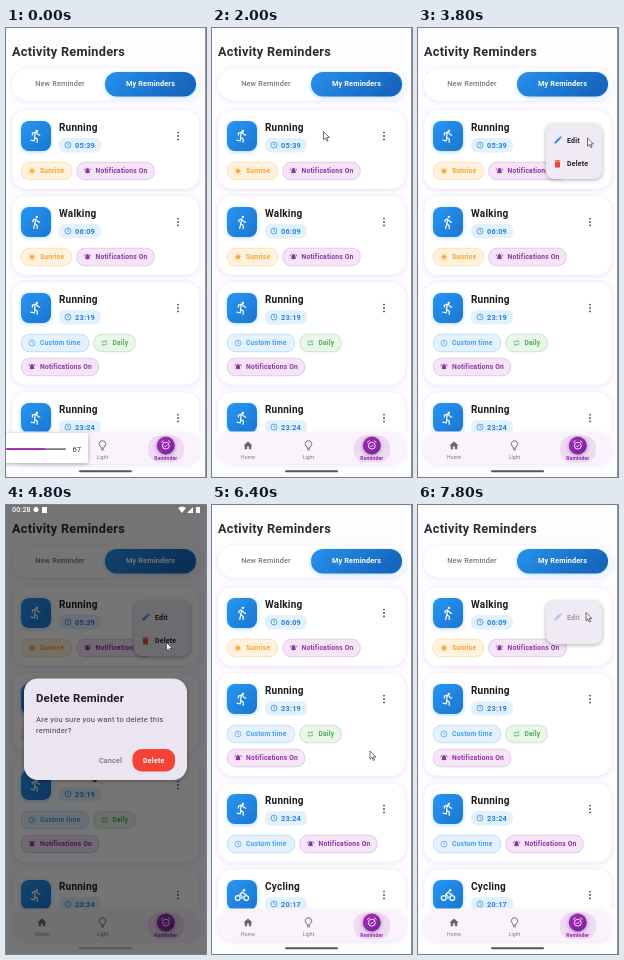
An HTML page that plays this animation: 200x449 px, repeating every 8000 ms.

```html
<!DOCTYPE html>
<html lang="en">
<head>
<meta charset="utf-8">
<title>Activity Reminders</title>
<style>
  html, body { margin: 0; width: 100%; height: 100%; overflow: hidden; background: #fdfcff; }
  svg { display: block; width: 100%; height: 100%; }
  text { font-family: Roboto, sans-serif; white-space: pre; }
  .line { fill: none; stroke: currentColor; stroke-width: 2; }
  .solid { fill: currentColor; }
  .soft { filter: drop-shadow(0 1.5px 2.5px rgba(110, 80, 190, .13)); }
  .blue { filter: drop-shadow(0 1.5px 2px rgba(33, 150, 243, .35)); }
  .raised { filter: drop-shadow(0 1.5px 2px rgba(0, 0, 0, .32)); }
</style>
</head>
<body>
<svg id="stage" viewBox="0 0 200 449"></svg>
<script>
const LOOP = 8000, STEP = 200;

// Icons on a 24-unit grid
const line = d => `<path class="line" d="${d}"/>`;
const solid = d => `<path class="solid" d="${d}"/>`;
const dot = (x, y, r) => `<circle class="solid" cx="${x}" cy="${y}" r="${r}"/>`;
const ring = (x, y, r) => `<circle class="line" cx="${x}" cy="${y}" r="${r}"/>`;
const icons = {
  run: dot(13.5, 3.5, 2) + line('M6 11V7.5l5-2 2.5 1.5q2 4 5.5 4M11 6l-1.5 8 4.5 3v6M10.5 14L9 20l-6-1.2'),
  walk: dot(13.5, 3.5, 2) + line('M7 12.5V9l4-2 3 3q1.5 2 4.5 2.5M11.5 7.5L10 15l4 3v5.5M10 14.5L8 23.5'),
  bike: dot(15.5, 4, 2) + ring(5, 17, 4) + ring(19, 17, 4) + line('M12 18v-4l-3.5-3 4-4 3 3.5h4'),
  sun: dot(12, 12, 5.5) + line('M12 1v22M1 12h22M4 4l16 16M20 4L4 20'),
  bell: solid('M12 3q6 1 6 8v5l2 2H4l2-2v-5q0-7 6-8zM10 20h4l-2 2z') + line('M2 10q0-5 4-7M22 10q0-5-4-7'),
  clock: ring(12, 12, 9) + line('M12 6v6l4 3'),
  repeat: line('M5 12V7h13M15 3l4 4-4 4M19 12v5H6M9 13l-4 4 4 4'),
  home: solid('M2 12l10-9 10 9h-3v8h-5v-6h-4v6H5v-8z'),
  bulb: line('M9 21.5h6M9 18v-3a7 7 0 1 1 6 0v3z'),
  alarm: ring(12, 13, 7.5) + line('M8.5 13l2.5 2.5 4.5-4.5M2 6l5-4M22 6l-5-4'),
  pencil: solid('M3 21v-4L15 5l4 4L7 21zM16 4l2-2 4 4-2 2z'),
  trash: solid('M6 7h12v14H6zM5 4h4l1-1h4l1 1h4v2H5z')
};

const icon = (name, x, y, size, color) =>
  `<g transform="translate(${x - size / 2} ${y - size / 2}) scale(${size / 24})" color="${color}">${icons[name]}</g>`;
const box = (x, y, w, h, r, fill, extra = '') =>
  `<rect x="${x}" y="${y}" width="${w}" height="${h}" rx="${r}" fill="${fill}" ${extra}/>`;
const label = (x, y, str, size, weight, fill, spacing = .2, anchor = 'start') =>
  `<text x="${x}" y="${y}" font-size="${size}" font-weight="${weight}" fill="${fill}" letter-spacing="${spacing}" text-anchor="${anchor}">${str}</text>`;

// Each chip: icon, text, width, text colour, fill, border
const chips = {
  sunrise: ['sun', 'Sunrise', 51, '#fba026', '#fff3e0', '#ffd08a'],
  notify: ['bell', 'Notifications On', 78, '#9130a8', '#f5e6f7', '#d9a9e2'],
  custom: ['clock', 'Custom time', 68, '#429ff0', '#e5f2fe', '#9bcffa'],
  daily: ['repeat', 'Daily', 42, '#4caf50', '#eaf6ea', '#a8d8aa']
};

function chip(name, x, y) {
  const [glyph, str, width, color, fill, border] = chips[name];
  return box(x + .25, y + .25, width - .5, 17.5, 8, fill, `stroke="${border}" stroke-width=".6"`) +
    icon(glyph, x + 11, y + 9, 8, color) + label(x + 19, y + 11.4, str, 6.7, 600, color);
}

function card(y, { name, glyph, time, rows }) {
  const height = 55 + rows.length * 24;
  let out = box(6, y, 187.5, height, 14, '#fff', 'class="soft" stroke="#f5eefa" stroke-width=".6"');
  out += box(15, y + 11, 30, 30, 8, 'url(#tile)', 'class="blue"') + icon(glyph, 30, y + 26, 14.5, '#fff');
  out += label(53, y + 21, name, 10, 700, '#1c1c1e', .22);
  out += box(53, y + 28, 42, 14.5, 6, '#e3f1fd') + icon('clock', 62, y + 35, 8, '#2480da');
  out += label(69, y + 37.8, time, 7.4, 700, '#2480da');
  for (const dy of [22.6, 26, 29.4]) out += `<circle cx="172" cy="${y + dy}" r=".95" fill="#505056"/>`;
  rows.forEach((row, i) => {
    let x = 15;
    for (const key of row) {
      out += chip(key, x, y + 52 + i * 24);
      x += chips[key][2] + 4.5;
    }
  });
  return out;
}

function list(reminders) {
  let y = 82;
  return reminders.map(item => {
    const out = card(y, item);
    y += 62 + item.rows.length * 24;
    return out;
  }).join('');
}

const reminders = [
  { name: 'Running', glyph: 'run', time: '05:39', rows: [['sunrise', 'notify']] },
  { name: 'Walking', glyph: 'walk', time: '06:09', rows: [['sunrise', 'notify']] },
  { name: 'Running', glyph: 'run', time: '23:19', rows: [['custom', 'daily'], ['notify']] },
  { name: 'Running', glyph: 'run', time: '23:24', rows: [['custom', 'notify']] },
  { name: 'Cycling', glyph: 'bike', time: '20:17', rows: [['custom', 'notify']] }
];

const gradient = (id, from, to, y2) =>
  `<linearGradient id="${id}" x2="1" y2="${y2}"><stop stop-color="${from}"/><stop offset="1" stop-color="${to}"/></linearGradient>`;

const defs = `<defs>${gradient('tile', '#2796f2', '#1a76d0', 1)}${gradient('tab', '#2792ee', '#1766bd', .3)}${gradient('violet', '#a52bba', '#7b1fa2', 1)}</defs>`;

const header = label(6, 28, 'Activity Reminders', 12.7, 700, '#2c2c30', .28) +
  box(6, 40.5, 188, 32, 16, '#fff', 'class="soft"') +
  box(99, 44, 91, 24.5, 12, 'url(#tab)', 'class="blue"') +
  label(54, 58.4, 'New Reminder', 7.3, 500, '#77777c', .16, 'middle') +
  label(144.5, 58.4, 'My Reminders', 7.3, 600, '#fff', .16, 'middle');

const nav = box(0, 403.5, 200, 46, 0, '#fdfcff') +
  box(6, 405, 187.5, 31, 15, '#faf3fc', 'class="soft"') +
  icon('home', 36, 417.5, 11, '#66666b') + label(36, 430.8, 'Home', 5, 400, '#77777c', .1, 'middle') +
  icon('bulb', 96.5, 417.5, 11, '#66666b') + label(96.5, 430.8, 'Light', 5, 400, '#77777c', .1, 'middle') +
  box(142, 407.5, 36, 27, 12, '#efd9f4') +
  '<circle class="raised" cx="159.8" cy="417.5" r="9" fill="url(#violet)"/>' +
  icon('alarm', 159.8, 417.2, 11, '#fff') + label(159.8, 432, 'Reminder', 5.1, 700, '#8e24aa', .1, 'middle');

const volume = box(-6, 405, 88, 30, 2, '#fff', 'class="raised"') +
  box(0, 420.3, 60, 1.7, .8, '#77777c') + box(0, 420.3, 39, 1.7, .8, '#9c27b0') +
  label(66.5, 424.3, '67', 7.6, 400, '#333', 0);

const menu = box(128, 96, 56, 55, 8, '#f0eaf4', 'id="menuBox" class="raised"') +
  `<g id="edit">${icon('pencil', 140, 112, 9.5, '#2e93ea')}${label(149, 115, 'Edit', 7, 600, '#222')}</g>` +
  `<g id="remove">${icon('trash', 139.5, 135.8, 10, '#ee4438')}${label(149, 138.4, 'Delete', 7, 600, '#222')}</g>`;

const dialog = box(0, 0, 200, 449, 0, '#000', 'opacity=".54"') +
  label(6, 7.3, '00:28', 7.2, 500, '#fff', .1) +
  '<g fill="#fff"><circle cx="30" cy="4.5" r="2.5"/><path d="M36 2h5v6h-5zM172 3q4-3 8 0l-4 5zM181 8l6-6v6zM190 2h4v6h-4z"/></g>' +
  box(18, 173.5, 163, 101.5, 14, '#ebe5f1', 'class="raised"') +
  label(30, 197, 'Delete Reminder', 11.4, 700, '#1c1c1e', .2) +
  label(30, 217, 'Are you sure you want to delete this', 7.6, 400, '#3f3d45', .21) +
  label(30, 228.3, 'reminder?', 7.6, 400, '#3f3d45', .21) +
  label(104.5, 258, 'Cancel', 7.1, 500, '#75727a', .2, 'middle') +
  box(126.5, 244, 42.5, 22.5, 9, '#f44336') +
  label(147.8, 258, 'Delete', 7.1, 700, '#fff', .2, 'middle');

const group = (id, content) => `<g id="${id}">${content}</g>`;

document.getElementById('stage').innerHTML = defs + box(0, 0, 200, 449, 0, '#fdfcff') + header +
  group('before', list(reminders.slice(0, 4))) + group('after', list(reminders.slice(1))) +
  nav + group('volume', volume) + group('menu', menu) + group('dialog', dialog) +
  box(73, 442.3, 53, 2, 1, '#55555a') + box(199.2, 0, .8, 449, 0, '#77777c') +
  group('cursor', '<path d="M0 0V8.2l1.9-1.7 1.4 3 1.3-.6-1.4-2.9h2.7z" fill="#fff" stroke="#333" stroke-width=".7"/>');

const part = id => document.getElementById(id);
const clamp = v => Math.min(1, Math.max(0, v));
const ease = v => v * v * (3 - 2 * v);

// Value of a [time, ...values] table at time t
function track(keys, t, curve = v => v) {
  const next = keys.findIndex(key => key[0] > t);
  if (next < 0) return keys[keys.length - 1].slice(1);
  if (next === 0) return keys[0].slice(1);
  const a = keys[next - 1], b = keys[next], k = curve((t - a[0]) / (b[0] - a[0]));
  return a.slice(1).map((v, i) => v + (b[i + 1] - v) * k);
}

const cursorPath = [
  [400, 191, 310], [600, 185.5, 267.5], [1800, 112, 105], [2000, 111.5, 103.5], [2200, 111.5, 103.5],
  [3000, 170, 108], [3800, 169.5, 110], [4400, 160.5, 137.5], [4800, 160.5, 137.5],
  [5600, 150, 253], [6000, 150, 253], [6400, 158, 246], [7400, 168, 107.5]
];
const menuOpen = [[3000, 0], [3200, .78], [3400, 1], [4800, 1], [5000, 0], [7600, 0], [7800, .78]];
const dialogOpen = [[4600, 0], [4800, 1], [5800, 1], [6000, 0]];

const show = (id, on) => part(id).style.display = on ? '' : 'none';
const fade = (id, v) => part(id).style.opacity = clamp(v);

function draw(t) {
  const [open] = track(menuOpen, t), [shade] = track(dialogOpen, t);
  const [x, y] = track(cursorPath, t, ease);
  show('before', t < 6000);
  show('after', t >= 6000);
  show('volume', t < 400);
  show('menu', open > 0);
  show('dialog', shade > 0);
  show('cursor', t >= 400);
  part('menuBox').setAttribute('height', 55 * open);
  fade('edit', (open - .63) / .37);
  fade('remove', (open - .8) / .2);
  fade('dialog', shade);
  part('cursor').setAttribute('transform', `translate(${x} ${y})`);
}

const start = performance.now();
function tick() {
  const t = (performance.now() - start) % LOOP;
  draw(Math.floor(t / STEP) * STEP);
  requestAnimationFrame(tick);
}
tick();
</script>
</body>
</html>
```
